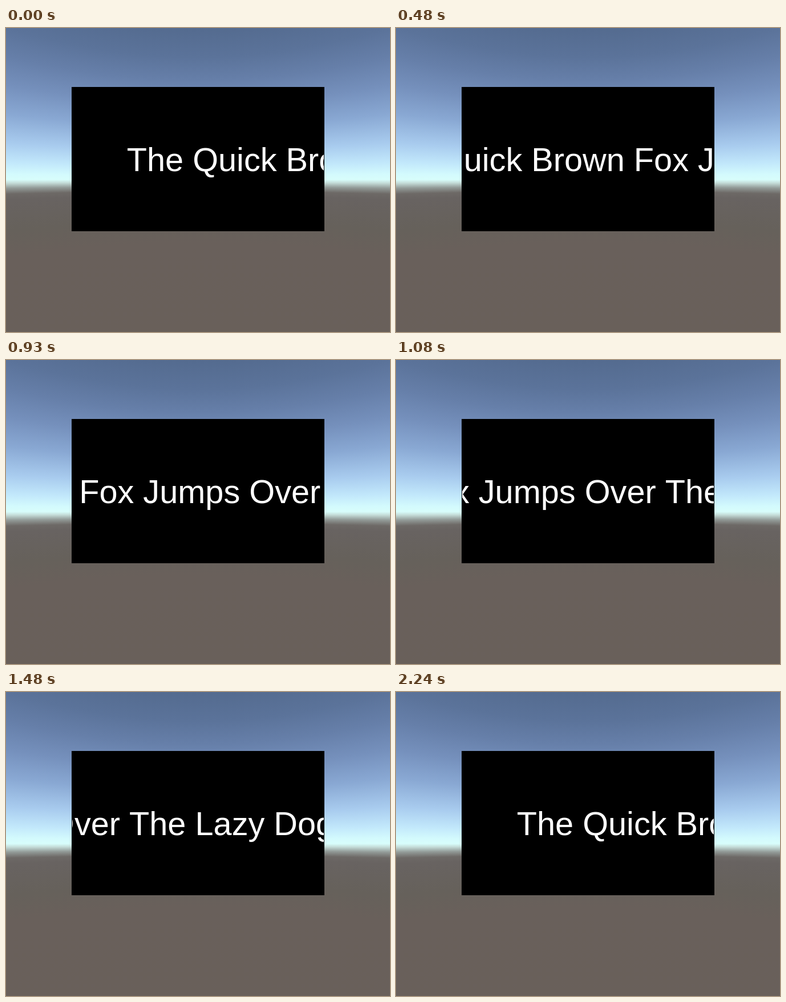
An HTML page with a canvas that plays this animation: 673x531 px, repeating every 2.75 s.

```html
<!DOCTYPE html>
<html lang="en">
<head>
<meta charset="utf-8">
<title>Scrolling text</title>
<style>
html, body { margin: 0; width: 100%; height: 100%; overflow: hidden; }
canvas { display: block; }
</style>
</head>
<body>
<canvas id="stage" width="673" height="531"></canvas>
<script>
const W = 673, H = 531, LOOP = 2750;
const ctx = document.getElementById('stage').getContext('2d');
const text = 'The Quick Brown Fox Jumps Over The Lazy Dog';

// Sky and ground colours by height, as seen in the outermost column.
const sky = [
  [-70, '#536a8e'], [0, '#5b739a'], [50, '#667fa9'], [100, '#7590bc'],
  [150, '#89a8d3'], [200, '#a8cbee'], [235, '#c2e8fb'], [255, '#d3fafd'],
  [265, '#d8fdfb'], [271, '#c4dcd8'], [280, '#929a97'], [290, '#6d6966'],
  [300, '#686361'], [355, '#66615b'], [400, '#69605b'], [600, '#69605a']
];

// Lines of equal elevation bend away from the horizon towards the sides.
function drawSky() {
  const horizon = H / 2, focal = 460, top = sky[0][0], bottom = sky.at(-1)[0];
  const edge = Math.hypot(focal, W / 2);
  for (let x = 0; x < W; x++) {
    const k = Math.hypot(focal, x + 0.5 - W / 2) / edge;
    const at = y => horizon + (y - horizon) * k;
    const g = ctx.createLinearGradient(0, at(top), 0, at(bottom));
    for (const [y, color] of sky) g.addColorStop((y - top) / (bottom - top), color);
    ctx.fillStyle = g;
    ctx.fillRect(x, 0, 1, H);
  }
}

// Scroll distance in pixels at times in ms.
const path = [
  [0, 0], [87, 0], [330, 156], [680, 383], [930, 542], [1280, 765],
  [1662, 1010], [2140, 1010], [2240, 0], [LOOP, 0]
];

function scrollAt(t) {
  const i = path.findIndex(p => p[0] > t);
  const [t0, a] = path[i - 1], [t1, b] = path[i];
  return a + (b - a) * (t - t0) / (t1 - t0);
}

// The picture advances in 50 ms steps, with one shorter step before 330 ms.
function step(t) {
  if (t < 90) return 0;
  if (t >= 1680 && t < 2190) return 1680;
  const start = t < 330 ? 90 : t < 2190 ? 330 : 2190;
  return start + Math.floor((t - start) / 50) * 50;
}

function draw(now) {
  ctx.fillStyle = '#000';
  ctx.fillRect(115, 103, 443, 252);
  ctx.save();
  ctx.beginPath();
  ctx.rect(116, 103, 441, 252);
  ctx.clip();
  ctx.font = '57.7px "Liberation Sans", Arial, sans-serif';
  ctx.fontKerning = 'none';
  ctx.fillStyle = '#fff';
  ctx.fillText(text, 211.7 - scrollAt(step(now % LOOP)), 250);
  ctx.restore();
}

drawSky();
const begin = performance.now();
function tick() {
  draw(performance.now() - begin);
  requestAnimationFrame(tick);
}
tick();
</script>
</body>
</html>
```
